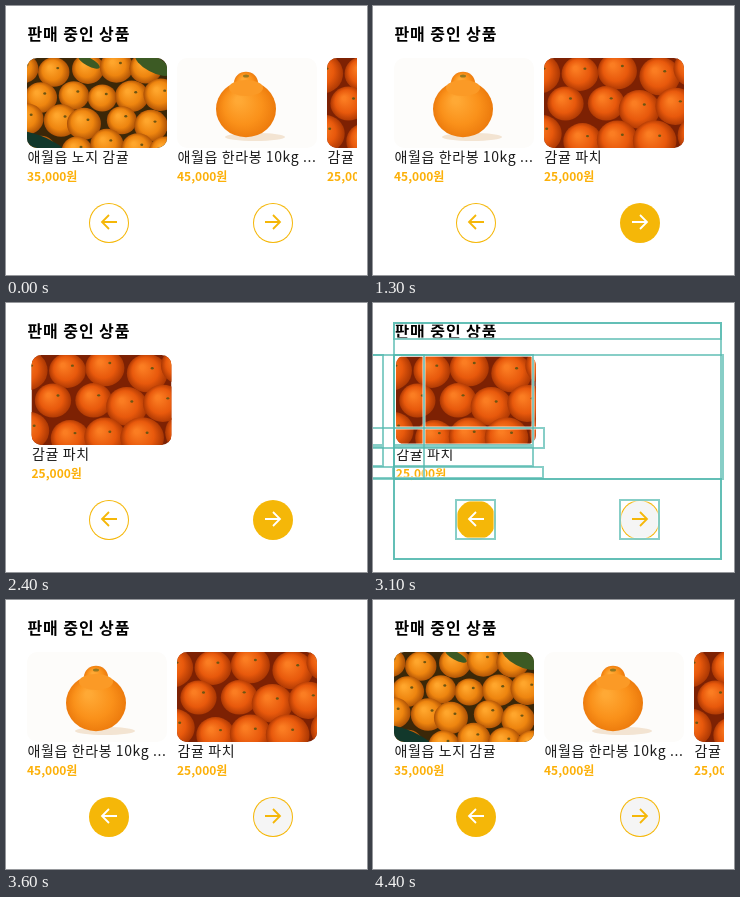
Recreate the animation shown at these times as an HTML page with a canvas. Size 361 by 269 pixels, loop 4.6 s.

```html
<!DOCTYPE html>
<html lang="ko">
<meta charset="utf-8">
<title>판매 중인 상품</title>
<style>
  html, body { margin: 0; width: 100%; height: 100%; overflow: hidden; background: #fff; }
  canvas { display: block; }
</style>
<canvas id="stage" width="361" height="269"></canvas>
<script>
const ctx = document.getElementById('stage').getContext('2d');
const LOOP = 4600, STEP = 100, LEAD = 12, HIGHLIGHT = 300;
const LEFT = 21, WIDTH = 330, TOP = 52, CARD = 150, PHOTO_W = 140, PHOTO_H = 90;
const PREV_X = 103, NEXT_X = 267, BUTTON_Y = 217, RADIUS = 20;
const AMBER = '#f5b708', TEAL = 'rgba(84,186,176,.7)';
const FONT = '"Noto Sans CJK KR", "Noto Sans CJK", sans-serif';

const clicks = [900, 2100, 3100, 3900];
const slides = [0, 1, 2, 1, 0];
const cards = [
  { name: '애월읍 노지 감귤', price: '35,000원', photo: crate },
  { name: '애월읍 한라봉 10kg ...', price: '45,000원', photo: hallabong },
  { name: '감귤 파치', price: '25,000원', photo: pile },
];

// Same curve as CSS "ease"
function ease(x) {
  if (x >= 1) return 1;
  let lo = 0, hi = 1, u;
  for (let i = 0; i < 20; i++) {
    u = (lo + hi) / 2;
    if (0.75 * u * (1 - u) + u ** 3 < x) lo = u; else hi = u;
  }
  return 0.3 * u * (1 - u) ** 2 + 3 * u * u * (1 - u) + u ** 3;
}

function seeded(seed) {
  return () => (seed = (seed * 16807) % 2147483647) / 2147483647;
}

function text(string, x, y, size, weight, color, spacing = 0) {
  ctx.font = `${weight} ${size}px ${FONT}`;
  ctx.letterSpacing = `${spacing}px`;
  ctx.fillStyle = color;
  ctx.fillText(string, x, y);
}

function ellipse(x, y, rx, ry, fill, angle = 0) {
  ctx.fillStyle = fill;
  ctx.beginPath();
  ctx.ellipse(x, y, rx, ry, angle, 0, 2 * Math.PI);
  ctx.fill();
}

function background(color) {
  ctx.fillStyle = color;
  ctx.fillRect(0, 0, PHOTO_W, PHOTO_H);
}

function fruit(x, y, r, [light, mid, dark]) {
  const g = ctx.createRadialGradient(x - r * 0.25, y - r * 0.3, r * 0.1, x, y, r);
  g.addColorStop(0, light);
  g.addColorStop(0.6, mid);
  g.addColorStop(1, dark);
  ellipse(x, y, r, r * 0.94, g);
}

// Staggered rows of fruit with a little disorder
function heap(r, seed, colors) {
  const random = seeded(seed);
  const jitter = () => (random() - 0.5) * r * 0.5;
  for (let row = 0, y = r * 0.7; y < PHOTO_H + r; row++, y += r * 1.65) {
    for (let x = row % 2 * r; x < PHOTO_W + r; x += r * 1.9) {
      const cx = x + jitter(), cy = y + jitter();
      fruit(cx, cy, r * (0.9 + random() * 0.2), colors);
      ellipse(cx + r * 0.25, cy - r * 0.25, 1.5, 1.2, '#6d5512');
    }
  }
}

function crate() {
  background('#3b2708');
  heap(16, 11, ['#ffa62c', '#ee850f', '#a94e05']);
  ellipse(126, 6, 20, 8, '#3c5a24', 0.5);
  ellipse(62, 4, 12, 4, '#3c5a24', 0.5);
  ellipse(10, 86, 30, 9, '#12382b', 0.35);
}

function hallabong() {
  background('#fdfcfa');
  ellipse(78, 79, 30, 4, '#f3e4d2');
  const colors = ['#ffa935', '#fa911a', '#ec7a0c'];
  fruit(69, 51, 30, colors);
  fruit(69, 25, 12, colors);
  ellipse(69, 30, 17, 8, '#fb9a26');
  ellipse(69, 18, 3, 1.5, '#98791f');
}

function pile() {
  background('#7d2103');
  heap(20, 5, ['#fb7d22', '#e8590c', '#a93603']);
}

function drawCard({ name, price, photo }, x) {
  ctx.save();
  ctx.translate(x, TOP);
  ctx.save();
  ctx.beginPath();
  ctx.roundRect(0, 0, PHOTO_W, PHOTO_H, 10);
  ctx.clip();
  photo();
  ctx.restore();
  text(name, 0.5, 104, 14, 400, '#1a1a1a', 0.6);
  text(price, 0, 123, 12, 700, '#fcb008');
  ctx.restore();
}

function button(x, direction, fill) {
  const active = fill === AMBER;
  ctx.save();
  ctx.translate(x, BUTTON_Y);
  ellipse(0, 0, RADIUS, RADIUS, AMBER);
  if (!active) ellipse(0, 0, RADIUS - 1, RADIUS - 1, fill);
  ctx.translate(0, -1);
  ctx.scale(direction, 1);
  ctx.strokeStyle = active ? '#fff' : AMBER;
  ctx.lineWidth = 1.8;
  ctx.beginPath();
  ctx.moveTo(-8, 0);
  ctx.lineTo(7, 0);
  ctx.moveTo(0, -7);
  ctx.lineTo(7, 0);
  ctx.lineTo(0, 7);
  ctx.stroke();
  ctx.restore();
}

// Outlines of everything that re-rendered, measured where the scroll began
function highlight(scroll) {
  const x0 = LEFT - scroll, right = LEFT + WIDTH - 3;
  const boxes = [
    [LEFT, 20, right, 36], [LEFT, 20, right, 256],
    [LEFT, TOP, right + 2, 176], [LEFT, 176, right, 256],
    [x0, TOP, x0 + WIDTH, 176], [x0, 125, x0 + 3 * CARD, 145],
  ];
  for (const x of [PREV_X, NEXT_X]) {
    boxes.push([x - RADIUS, BUTTON_Y - RADIUS, x + RADIUS - 1, BUTTON_Y + RADIUS - 1]);
  }
  cards.forEach((_, i) => {
    const x = x0 + i * CARD, end = x + PHOTO_W - 1;
    boxes.push([x, TOP, end, 142], [x, 144, end, 163], [x, 164, x + CARD - 1, 175]);
  });
  for (const [width, color] of [[3, 'rgba(255,255,255,.8)'], [2, TEAL]]) {
    ctx.lineWidth = width;
    ctx.strokeStyle = color;
    for (const [l, t, r, b] of boxes) ctx.strokeRect(l, t, r - l, b - t);
  }
}

function draw(now) {
  const t = Math.floor((now % LOOP) / STEP) * STEP;
  const i = clicks.findLastIndex(at => t >= at);
  const idle = i < 0;
  const from = idle ? 0 : slides[i] * CARD;
  const to = slides[i + 1] * CARD;
  const back = to < from;
  const elapsed = idle ? Infinity : t - clicks[i];
  const scroll = from + (to - from) * ease((elapsed + LEAD) / (back ? 500 : 400));

  ctx.fillStyle = '#fff';
  ctx.fillRect(0, 0, 361, 269);
  text('판매 중인 상품', LEFT + 0.5, 34, 16, 700, '#000', 0.9);

  ctx.save();
  ctx.beginPath();
  ctx.rect(LEFT, TOP, WIDTH, 126);
  ctx.clip();
  cards.forEach((card, n) => drawCard(card, LEFT + n * CARD - scroll));
  ctx.restore();

  button(PREV_X, -1, back ? AMBER : '#fff');
  button(NEXT_X, 1, idle ? '#fff' : back ? '#f5f5f5' : AMBER);
  if (elapsed < HIGHLIGHT) highlight(from);
  requestAnimationFrame(draw);
}

requestAnimationFrame(draw);
</script>
</html>
```
